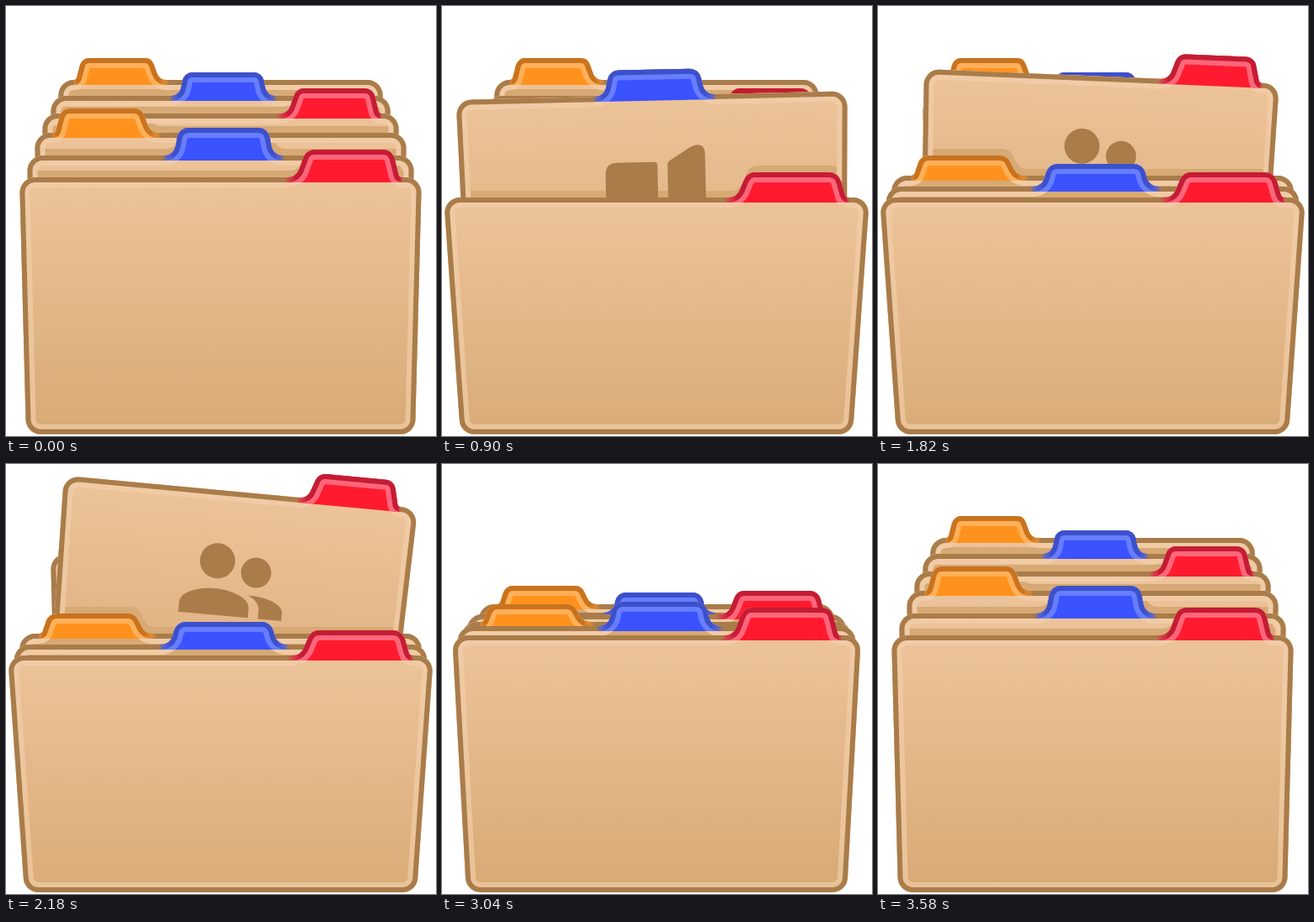
An HTML page with a canvas for the animation above (3.6 s loop, 512x512 px).

```html
<!DOCTYPE html>
<html lang="en">
<head>
<meta charset="utf-8">
<title>Card index dividers</title>
<style>
  html, body { margin: 0; width: 100%; height: 100%; overflow: hidden; background: #fff; }
  canvas { display: block; }
</style>
</head>
<body>
<canvas id="stage" width="512" height="512"></canvas>
<script>
const ctx = document.getElementById('stage').getContext('2d');
const LOOP = 3600, CENTER = 255.5, PIVOT = 260;

const BROWN = '#a97c4a';
const COLORS = {
  orange: { fill: [255, 146, 29], light: [255, 176, 88], dark: [201, 115, 30] },
  blue: { fill: [58, 82, 255], light: [102, 126, 255], dark: [61, 80, 204] },
  red: { fill: [255, 26, 48], light: [255, 102, 122], dark: [196, 28, 52] }
};

// Left foot, left head, right head, right foot as shares of the top edge; foot radii.
const TABS = {
  orange: [0.056, 0.073, 0.287, 0.312, 4, 14],
  blue: [0.379, 0.393, 0.622, 0.636, 14, 14],
  red: [0.688, 0.713, 0.927, 0.944, 14, 4]
};

// Pose: [top, left, tab height, bottom left, rotation]
const rest = (top, left, h) => [top, left, h, left + 8, 0];
const front = (top, left, h) => [top, left, h, 22, 0];
const mid = (top, left, h) => [top, left, h, 29, 0];
const raised = (top, left, h, rot) => [top, left, h, left + 8, rot];

const ease = {
  in: x => x * x,
  out: x => x * (2 - x),
  both: x => x < 0.5 ? 2 * x * x : 1 - 2 * (1 - x) * (1 - x)
};

// Key: [time, pose, easing used to reach it]
const goBack = (a, b, m, from = 2810) => [[from, b], [3040, m], [3560, a]];

function tip(a, b, m, start, end) {
  return [[start, a], [end, b], ...goBack(a, b, m, Math.max(2810, end))];
}

function show(a, up, b, m, [t0, t1, t2, t3], via = []) {
  return [[t0, a], [t1, up], [t2, up], ...via, [t3, b, via.length ? 'out' : 'both'],
    ...goBack(a, b, m)];
}

const folders = [
  { tab: 'orange', keys: tip(rest(88, 62, 26), front(168, 40, 22), mid(167, 45, 22), 2790, 2970) },
  { tab: 'blue', keys: tip(rest(107, 53, 28), front(179, 32, 24), mid(177, 38, 24), 2480, 2660) },
  { tab: 'red', icon: people, keys: show(rest(128, 43, 30), raised(24, 45, 31, 5.6),
      front(190, 24, 25), mid(179, 30, 28), [1650, 2020, 2105, 2585]) },
  { tab: 'orange', keys: tip(rest(151, 34, 29), front(202, 16, 24), mid(188, 23, 21), 1345, 1525) },
  { tab: 'blue', icon: megaphone, keys: show(rest(178, 25, 33), raised(38, 25, 33, -5),
      front(215, 9, 27), mid(193, 18, 29), [180, 520, 690, 1240],
      [[900, raised(106, 22.5, 31, -1.3), 'in']]) },
  { tab: 'red', keys: tip(rest(204, 16, 33), front(228, 2, 30), mid(204, 12, 33), 10, 270) }
];

function poseAt(keys, t) {
  if (t <= keys[0][0]) return keys[0][1];
  for (let i = 1; i < keys.length; i++) {
    const [t1, b, name = 'both'] = keys[i];
    if (t < t1) {
      const [t0, a] = keys[i - 1];
      const k = ease[name]((t - t0) / (t1 - t0));
      return a.map((v, j) => v + (b[j] - v) * k);
    }
  }
  return keys[keys.length - 1][1];
}

// Outline in local space: x from the centre, y from the top edge.
function outline(tab, [top, left, h, foot], isFront) {
  const half = CENTER - left, base = CENTER - foot, r = 18;
  const bottom = isFront ? 510 - top : Math.min(300, 500 - top);
  const s = half / 240;
  const [l0, l1, r1, r0] = TABS[tab].slice(0, 4).map(v => (v * 2 - 1) * half);
  const [rl, rr] = TABS[tab].slice(4).map(v => v * s);
  const path = new Path2D();
  path.moveTo(0, bottom);
  [
    [-base, bottom, r], [-half, 0, r],
    [l0, 0, rl], [l1, -h, 14 * s], [r1, -h, 14 * s], [r0, 0, rr],
    [half, 0, r], [base, bottom, r], [0, bottom, 0]
  ].forEach(([x, y, radius], i, pts) => {
    if (i < pts.length - 1) path.arcTo(x, y, pts[i + 1][0], pts[i + 1][1], radius);
  });
  path.closePath();
  return { path, a: l0 - rl, b: r0 + rr, rl, rr, h };
}

function place(pose, dx = 0, dy = 0) {
  ctx.setTransform(1, 0, 0, 1, CENTER + dx, pose[0] + PIVOT + dy);
  ctx.rotate(pose[4] * Math.PI / 180);
  ctx.translate(0, -PIVOT);
}

function line(path, width, style) {
  ctx.lineWidth = width;
  ctx.strokeStyle = style;
  ctx.stroke(path);
}

function shade(from, to) {
  const g = ctx.createLinearGradient(0, 0, 0, 300);
  g.addColorStop(0, from);
  g.addColorStop(1, to);
  return g;
}

function people() {
  ctx.beginPath();
  ctx.arc(-20, 84, 21, 0, 7);
  ctx.fill();
  ctx.beginPath();
  ctx.arc(27, 94, 18, 0, 7);
  ctx.fill();
  ctx.fill(new Path2D('M-61 148.5V137C-61 124-38 117-20 117S22 124 22 137V148.5Z'));
  ctx.fill(new Path2D('M20 122C42 121 62 129 62 139V148.5H34V138C34 131 28 125 20 122Z'));
}

function megaphone() {
  ctx.fill(new Path2D('M-43 79H1Q5 79 5 83V131Q5 135 1 135H-43Q-57 135-57 121V93Q-57 79-43 79Z'));
  ctx.fill(new Path2D('M17 83Q17 79 21 77L45 62Q62 55 62 71V143Q62 159 45 152L21 137Q17 135 17 131Z'));
}

function drawTab({ path, a, b, rl, rr, h }, tab) {
  const fade = rgb => {
    const g = ctx.createLinearGradient(a, 0, b, 0), n = b - a;
    g.addColorStop(0, `rgba(${rgb},0)`);
    g.addColorStop(rl / n, `rgba(${rgb},1)`);
    g.addColorStop(1 - rr / n, `rgba(${rgb},1)`);
    g.addColorStop(1, `rgba(${rgb},0)`);
    return g;
  };
  const c = COLORS[tab];
  ctx.beginPath();
  ctx.rect(a, -h - 1, b - a, h + 7);
  ctx.clip();
  ctx.fillStyle = fade(c.fill);
  ctx.fill(path);
  line(path, 24, fade(c.light));
  line(path, 12, fade(c.dark));
}

function drawFolder(folder, pose, shape, next) {
  ctx.save();
  place(pose);
  ctx.fillStyle = shade('#edc39a', '#d8aa76');
  ctx.fill(shape.path);
  ctx.clip(shape.path);
  if (next) {
    place(next.pose, 3, -8);
    ctx.fillStyle = '#d7a974';
    ctx.fill(next.shape.path);
    place(pose);
  }
  if (folder.icon) {
    ctx.fillStyle = BROWN;
    folder.icon();
  }
  line(shape.path, 24, shade('#f1cba6', '#e9c297'));
  line(shape.path, 12, BROWN);
  drawTab(shape, folder.tab);
  ctx.restore();
}

function draw(t) {
  ctx.setTransform(1, 0, 0, 1, 0, 0);
  ctx.fillStyle = '#fff';
  ctx.fillRect(0, 0, 512, 512);
  const last = folders.length - 1;
  const views = folders.map((f, i) => {
    const pose = poseAt(f.keys, t);
    return { pose, shape: outline(f.tab, pose, i === last) };
  });
  folders.forEach((f, i) => drawFolder(f, views[i].pose, views[i].shape, views[i + 1]));
}

const start = performance.now();
function tick() {
  draw((performance.now() - start) % LOOP);
  requestAnimationFrame(tick);
}
tick();
</script>
</body>
</html>
```
